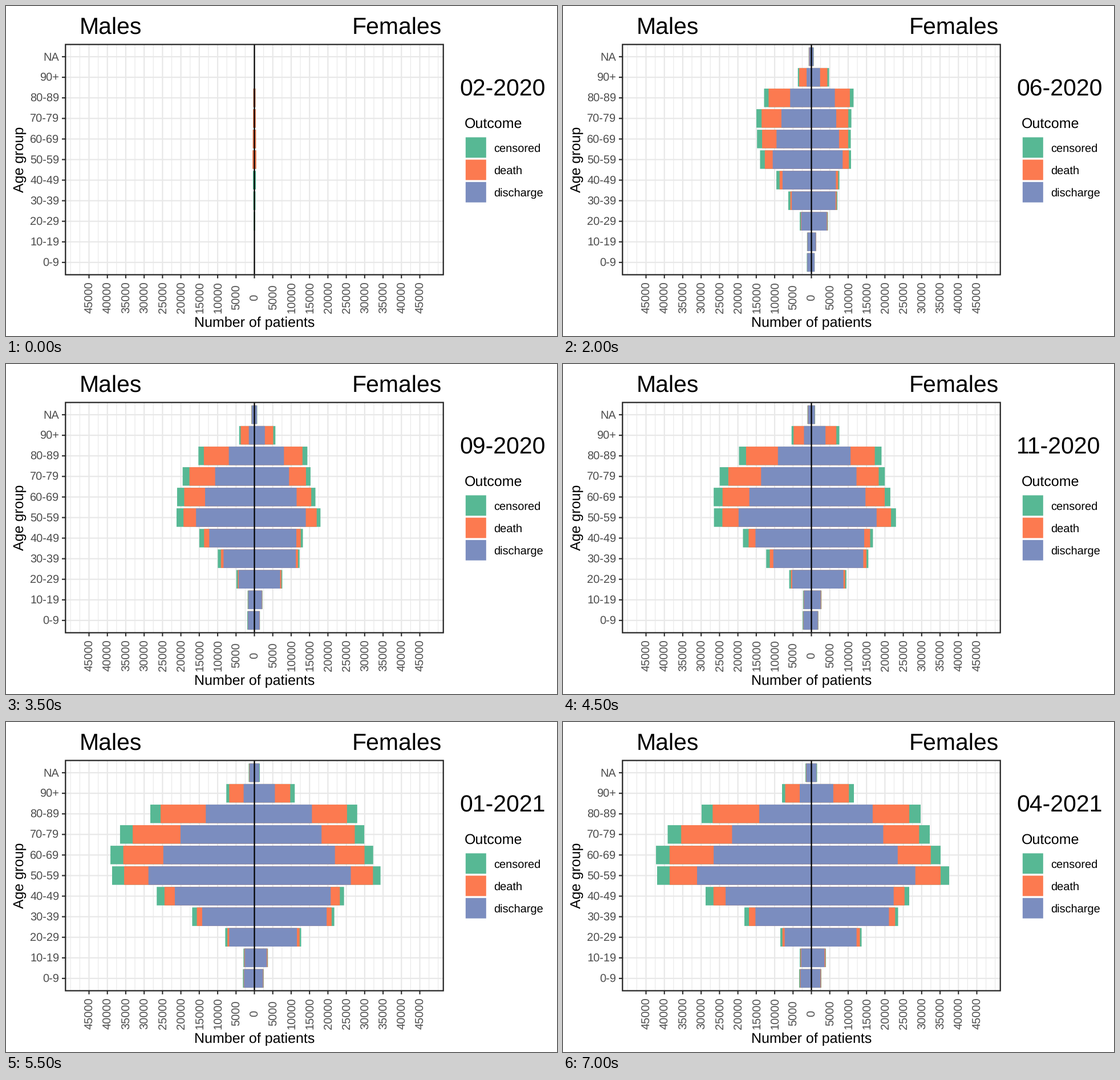
These frames come from a looping animation (966x579 px, 7500 ms). A matplotlib script:

```python
import matplotlib.pyplot as plt
import numpy as np
from matplotlib.animation import FuncAnimation
from matplotlib.patches import Rectangle

W, H, DPI = 966, 579, 64
PT = 72 / DPI
plt.rcParams["font.family"] = "Liberation Sans"
plt.rcParams["text.hinting"] = "none"

MONTHS = 15
OUTCOMES = {"censored": "#57b894", "death": "#fc7a50", "discharge": "#7b8dbf"}
AGES = [f"{a}-{a + 9}" for a in range(0, 90, 10)] + ["90+", "NA"]
LEFT, RIGHT, TOP, BOTTOM = 104.3, 766.7, 67.5, 471.5
ZERO, STEP = 435.5, 32.22          # x of zero, pixels per 5000 patients
ROW = np.arange(len(AGES))
ROW_Y = 449.9 - 36.09 * ROW

# Per sex: final bar lengths in pixels, discharge share at a few age rows,
# censored share at rows 3 and 9 (early, late), early extra discharge share
MALE = dict(
    sign=-1,
    final=[21.5, 20.5, 54.5, 117.5, 185.5, 270.5, 272.5, 252, 192.5, 51.5, 10.5],
    discharge=([0, 2, 4, 5, 6, 9, 10], [.89, .86, .811, .741, .629, .398, .85]),
    censored=([.095, .095], [.068, .107]),
    drift=.015)
FEMALE = dict(
    sign=1,
    final=[17.5, 25.5, 88, 152, 171.5, 241.5, 226.5, 207.5, 191.5, 74.5, 10],
    discharge=([0, 3, 4, 6, 7, 9, 10], [.91, .894, .841, .668, .607, .515, .9]),
    censored=([.033, .095], [.034, .118]),
    drift=.04)

# Share of the final count reached at key months, a parabola over age:
# month, lowest share, bend, age row of the lowest share, female lag
GROWTH = [
    (0, 0, 0, 0, 0),
    (2, .195, .006, 3, .047),
    (4, .33, .0078, 4.4, .045),
    (7, .497, .0045, 6.3, .025),
    (10, .768, .008, 5.4, .01),
    (12, .957, .0009, 3, .006),
    (14, 1, 0, 0, 0),
]

fig = plt.figure(figsize=(W / DPI, H / DPI), dpi=DPI, facecolor="white")
ax = fig.add_axes([0, 0, 1, 1])
ax.set(xlim=(0, W), ylim=(H, 0))
ax.axis("off")


def text(x, y, s, px, color="black", ha="left", rotation=0):
    return ax.text(x, y, s, fontsize=px * PT, color=color, ha=ha,
                   va="baseline", rotation=rotation, rotation_mode="anchor")


def line(x, y, width, color, z):
    ax.plot(x, y, lw=width * PT, color=color, zorder=z,
            solid_capstyle="butt", snap=False)


def box(x, y, w, h, z=3, **style):
    return ax.add_patch(Rectangle((x, y), w, h, zorder=z, snap=False, **style))


def draw_panel():
    for k in range(-20, 21):
        x = ZERO + k * STEP / 2
        major = k % 2 == 0 and abs(k) < 20
        line([x, x], [TOP, BOTTOM], 2.2 if major else 1.1, "#e8e8e8", 1)
        if major:
            line([x, x], [BOTTOM, BOTTOM + 6.3], 2.2, "#333333", 4)
            text(x + 7, 511, str(abs(k) * 2500), 20, "#4d4d4d", "center", 90)
    for y, age in zip(ROW_Y, AGES):
        line([LEFT, RIGHT], [y, y], 2.2, "#e8e8e8", 1)
        line([LEFT - 6.3, LEFT], [y, y], 2.2, "#333333", 4)
        text(93.5, y + 7, age, 20, "#4d4d4d", "right")
    line([ZERO, ZERO], [TOP, BOTTOM], 2.2, "black", 4)
    box(LEFT, TOP, RIGHT - LEFT, BOTTOM - TOP, 5, fill=False,
        ec="#222222", lw=2.2 * PT)


def draw_labels():
    text(128.8, 50, "Males", 41)
    text(606.5, 50, "Females", 41)
    text(ZERO, 563, "Number of patients", 25, ha="center")
    text(31, 269.5, "Age group", 25, ha="center", rotation=90)
    text(804, 214, "Outcome", 25)
    for i, (name, color) in enumerate(OUTCOMES.items()):
        y = 230.4 + 39.2 * i
        box(805.8, y, 36, 35.8, fc=color, lw=0)
        text(855.5, y + 25, name, 20)


def make_bars():
    # Each outcome is a layer from zero; shorter layers cover longer ones
    return [[box(ZERO, y - 16.24, 0, 32.48, 2 + i / 10, fc=color, lw=0)
             for y in ROW_Y] for i, color in enumerate(OUTCOMES.values())]


def reached(month, row, female):
    months = [g[0] for g in GROWTH]
    row = np.clip(row, 2, 8.5)
    shares = [low + bend * (row - turn) ** 2 - lag * female
              for _, low, bend, turn, lag in GROWTH]
    return np.interp(month, months, shares)


def calendar(month):
    # Waves pull counts ahead of or behind the straight line between key months
    waves = {1: .7, 3: 3.2, 5: 5.26, 6: 6.34, 8: 7.6, 9: 8.44, 11: 11.6, 13: 13.2}
    return waves.get(month, month)


def opening_layers():
    length = np.interp(ROW, [1, 2, 5, 8, 9], [0, 1.3, 3.2, 1.9, 0])
    return np.array([length, length * (ROW >= 5), length * 0])


def month_layers(month, sex):
    share = [reached(calendar(month), r, sex["sign"] > 0) for r in ROW]
    total = np.array(sex["final"]) * share
    early = np.clip((MONTHS - 1 - month) / 12, 0, 1)
    first, last = (np.interp(ROW, [3, 9], ends) for ends in sex["censored"])
    censored = early * first + (1 - early) * last
    drift = sex["drift"] - .023 * np.clip(ROW - 6, 0, 3)
    discharge = np.interp(ROW, *sex["discharge"]) + early * drift
    discharge = np.minimum(discharge, 1 - censored)
    return total * np.array([np.ones(len(ROW)), 1 - censored, discharge])


draw_panel()
draw_labels()
sides = [(sex, make_bars()) for sex in (MALE, FEMALE)]
date = text(795, 158, "", 41)


def update(month):
    date.set_text(f"{(month + 1) % 12 + 1:02d}-{2020 + (month + 1) // 12}")
    for sex, bars in sides:
        layers = month_layers(month, sex) if month else opening_layers()
        for patches, widths in zip(bars, layers):
            for patch, w in zip(patches, widths):
                patch.set_width(sex["sign"] * w)
    return []


anim = FuncAnimation(fig, update, frames=MONTHS, interval=500,
                     repeat=True, repeat_delay=0, blit=False)
plt.show()
```
